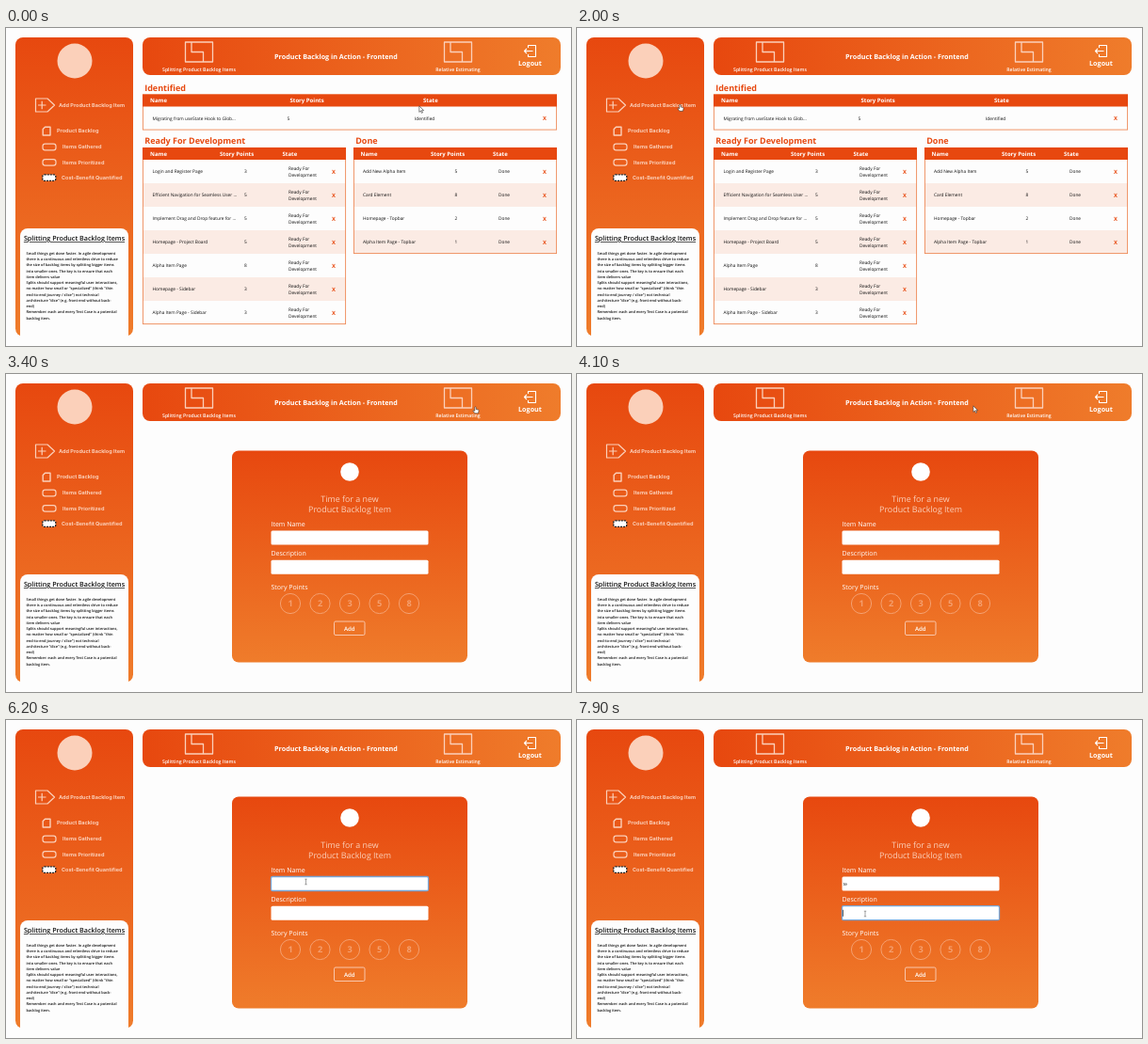
An HTML page that plays this animation: 600x338 px, repeating every 8000 ms.

```html
<!DOCTYPE html>
<html lang="en">
<head>
<meta charset="utf-8">
<title>Product Backlog</title>
<style>
html, body { margin: 0; width: 100%; height: 100%; overflow: hidden; background: #fdfdfd; }
svg { display: block; width: 600px; height: 338px; }
text { font-family: "Open Sans", "Noto Sans", sans-serif; white-space: pre; text-rendering: geometricPrecision; }
.menu text { font-family: Inter, Roboto, sans-serif; }
</style>
</head>
<body>
<svg id="stage" viewBox="0 0 600 338" xmlns="http://www.w3.org/2000/svg"></svg>
<script>
const LOOP = 8000, ORANGE = '#e7480f', PEACH = '#fbd0ba', INK = '#111';

// y is the middle of the capitals
const text = (x, y, s, size, fill = INK, weight = 400, anchor = 'start', extra = '') =>
  `<text x="${x}" y="${y + size * .36}" font-size="${size}" fill="${fill}" font-weight="${weight}" text-anchor="${anchor}" ${extra}>${s}</text>`;
const rect = (x, y, w, h, fill, r = 0, extra = '') =>
  `<rect x="${x}" y="${y}" width="${w}" height="${h}" rx="${r}" fill="${fill}" ${extra}/>`;
const line = (d, stroke = PEACH, width = 1.2) =>
  `<path d="${d}" fill="none" stroke="${stroke}" stroke-width="${width}" stroke-linejoin="round"/>`;
const gradient = (id, x, y) =>
  `<linearGradient id="${id}" x2="${x}" y2="${y}"><stop stop-color="${ORANGE}"/><stop offset="1" stop-color="#ef7c2b"/></linearGradient>`;

function sidebar() {
  const notes = [
    'Small things get done faster. In agile development',
    'there is a continuous and relentless drive to reduce',
    'the size of backlog items by splitting bigger items',
    'into smaller ones. The key is to ensure that each',
    'item delivers value',
    'Splits should support meaningful user interactions,',
    'no matter how small or "specialized" (think "thin',
    'end-to-end journey / slice") not technical',
    'architecture "dice" (e.g. front-end without back-',
    'end)',
    'Remember: each and every Test Case is a potential',
    'backlog item.'];
  const links = [[56, 82, 'Add Product Backlog Item'], [54, 109.5, 'Product Backlog'],
    [60, 126.5, 'Items Gathered'], [60, 143, 'Items Prioritized'], [59, 159, 'Cost-Benefit Quantified']];
  const pill = y => rect(39, y, 14, 6.6, 'none', 2.6, `stroke="${PEACH}" stroke-width="1.2"`);
  return rect(10, 10, 125, 317.5, 'url(#down)', 8) +
    `<circle cx="73" cy="35" r="18.5" fill="${PEACH}"/>` +
    line('M31.5 75H44L51.5 82L44 89H31.5ZM34 82H42.5M38.2 77.8V86.2') +
    line('M41.5 105.2H47V114H39.2V107.6Z', PEACH, 1.4) +
    pill(123.2) + pill(139.6) +
    rect(38.8, 155.8, 14, 6.6, '#fff', 2, 'stroke="#222" stroke-width="1.3" stroke-dasharray="2 1"') +
    `<g class="menu">${links.map(l => text(...l, 5.55, PEACH, 700)).join('')}</g>` +
    `<path d="M15 328V221a8 8 0 0 1 8-8H122a8 8 0 0 1 8 8V328Z" fill="#fdfdfd"/>` +
    text(72.5, 223.7, 'Splitting Product Backlog Items', 7.15, INK, 600, 'middle', 'text-decoration="underline"') +
    notes.map((s, i) => text(21.5, 239.3 + i * 6.27, s, 3.95, INK, 600)).join('');
}

function topbar() {
  const split = x => line(`M${x} 15H${x + 29}V36H${x}ZM${x + 6.5} 15V25.5H${x + 19}V36`, PEACH, 1.3);
  return rect(145, 10, 444, 40, 'url(#across)', 8) + split(190.5) + split(465.5) +
    text(205, 44.5, 'Splitting Product Backlog Items', 5.2, '#fff', 600, 'middle') +
    text(480, 44.5, 'Relative Estimating', 5.15, '#fff', 600, 'middle') +
    text(350.5, 30, 'Product Backlog in Action - Frontend', 7.2, '#fff', 700, 'middle') +
    line('M554.5 21V18.5H562.5V30.5H554.5V28M559.5 24.5H550.5M553 22L550.5 24.5L553 27', '#fff', 1.1) +
    text(556.5, 37.5, 'Logout', 7.2, '#fff', 700, 'middle');
}

// cols: left edges of header and cell text for name, points, state; x of the delete mark
function table(title, x, y, w, cols, rows) {
  const bottom = y + 13 + rows.length * 25;
  let out = text(x + 2.2, y - 6.8, title, 9, ORANGE, 700);
  rows.forEach(([name, points, state], i) => {
    const mid = y + 25.7 + i * 25, parts = state.split('|');
    if (i % 2) out += rect(x, y + 13 + i * 25, w, 25, '#fbebe4');
    out += text(cols.cell[0], mid, name, 4.8) + text(cols.cell[1], mid, points, 4.8) +
      parts.map((s, k) => text(cols.cell[2], mid + (k - (parts.length - 1) / 2) * 7.2, s, 4.8)).join('') +
      text(cols.del, mid, 'X', 5.8, ORANGE, 700, 'middle');
  });
  out += rect(x + .4, y + .4, w - .8, bottom - y - .8, 'none', 0, 'stroke="#ee8a58" stroke-width=".9"');
  out += rect(x, y, w, 13, ORANGE);
  ['Name', 'Story Points', 'State'].forEach((s, i) => out += text(cols.head[i], y + 6.7, s, 6, '#fff', 700));
  return out;
}

function board() {
  const ready = [['Login and Register Page', 3], ['Efficient Navigation for Seamless User ...', 5],
    ['Implement Drag and Drop feature for ...', 5], ['Homepage - Project Board', 5],
    ['Alpha Item Page', 8], ['Homepage - Sidebar', 3], ['Alpha Item Page - Sidebar', 3]];
  const done = [['Add New Alpha Item', 5], ['Card Element', 8], ['Homepage - Topbar', 2], ['Alpha Item Page - Topbar', 1]];
  return table('Identified', 145, 70.5, 440,
      { head: [153, 301.5, 443], cell: [155.5, 298.5, 434], del: 572 },
      [['Migrating from useState Hook to Glob...', 5, 'Identified']]) +
    table('Ready For Development', 145, 127, 216,
      { head: [153, 227, 293.5], cell: [155.5, 253, 300], del: 348 },
      ready.map(r => [...r, 'Ready For|Development'])) +
    table('Done', 369, 127, 216,
      { head: [376.5, 451, 517], cell: [379, 476.5, 523], del: 572 },
      done.map(r => [...r, 'Done']));
}

function form() {
  const field = (y, id) => rect(281.5, y, 167, 15, '#fff', 1.5, `id="${id}" stroke-width="1.3"`);
  return rect(240, 81.5, 250, 225, 'url(#down)', 7) +
    '<circle cx="365" cy="104" r="9.8" fill="#fff"/>' +
    text(365, 132.3, 'Time for a new', 8.9, PEACH, 400, 'middle') +
    text(365, 144, 'Product Backlog Item', 8.9, PEACH, 400, 'middle') +
    text(281.5, 159.5, 'Item Name', 7, '#fff') + field(166.5, 'field0') +
    text(281.5, 190.8, 'Description', 7, '#fff') + field(197.7, 'field1') +
    text(281.5, 226, 'Story Points', 7, '#fff') +
    [1, 2, 3, 5, 8].map((n, i) => {
      const x = 302 + i * 31.5;
      return `<g opacity=".5"><circle cx="${x}" cy="244" r="10.6" fill="none" stroke="${PEACH}"/>` +
        text(x, 244, n, 9.2, PEACH, 700, 'middle') + '</g>';
    }).join('') +
    rect(348.5, 263, 32.5, 14.5, 'none', 1.5, `stroke="${PEACH}" stroke-width=".9"`) +
    text(364.8, 270.5, 'Add', 6.1, '#fff', 600, 'middle') +
    text(282.7, 174.3, '', 4.6, INK, 400, 'start', 'id="typed"') +
    rect(282.3, 0, .7, 7, '#222', 0, 'id="caret"');
}

const pointers = {
  arrow: '<path d="M0 0V6.6L1.6 5.2L2.7 7.6L3.7 7.1L2.7 4.8H4.8Z" fill="#fff" stroke="#333" stroke-width=".6"/>',
  hand: '<path d="M-.7 .3Q0-.5.7.3V2.5L3.2 3.1Q3.7 3.3 3.6 4L3 6.8H-.7L-2.6 4.1Q-2.2 3.3-.7 4.2Z" fill="#fff" stroke="#333" stroke-width=".6"/>',
  beam: '<path d="M-1.2-2.8H1.2M0-2.8V2.8M-1.2 2.8H1.2" stroke="#666" stroke-width=".6"/>'
};

const $ = id => document.getElementById(id);
$('stage').innerHTML = `<defs>${gradient('down', 0, 1)}${gradient('across', 1, 0)}</defs>` +
  sidebar() + topbar() + `<g id="board">${board()}</g><g id="form">${form()}</g>` +
  Object.entries(pointers).map(([k, s]) => `<g id="${k}">${s}</g>`).join('');

// pointer stops: time, x, y
const path = [[0, 438.8, 82.8], [400, 438.8, 82.8], [1600, 109.5, 81.5], [2400, 109.5, 81.5], [3300, 498.5, 35],
  [3800, 498.5, 35], [4700, 199, 30.5], [5000, 199, 30.5], [5700, 318.5, 172], [7000, 318.5, 172],
  [7400, 306, 206], [LOOP, 306, 206]];

function pointerAt(t) {
  const i = path.findIndex(p => p[0] > t), [t0, x0, y0] = path[i - 1], [t1, x1, y1] = path[i];
  const u = (t - t0) / (t1 - t0), e = u * u * (3 - 2 * u);
  return [x0 + (x1 - x0) * e, y0 + (y1 - y0) * e];
}

const inside = (x, y, l, t, r, b) => x >= l && x <= r && y >= t && y <= b;
function pointerKind(x, y, formOpen) {
  if (formOpen && (inside(x, y, 281, 166, 449, 182) || inside(x, y, 281, 197, 449, 213))) return 'beam';
  const link = inside(x, y, 30, 73, 130, 165) || inside(x, y, 164, 13, 246, 48) || inside(x, y, 455, 13, 505, 48);
  return link ? 'hand' : 'arrow';
}

const show = (id, on) => $(id).setAttribute('visibility', on ? 'visible' : 'hidden');

function draw(now) {
  const t = Math.floor(now % LOOP / 100) * 100, open = t >= 2100;
  show('board', !open);
  $('form').style.display = open ? '' : 'none';

  const focus = t >= 7500 ? 1 : t >= 5700 ? 0 : -1;
  for (const i of [0, 1]) {
    $('field' + i).setAttribute('stroke', i === focus ? '#78a5d4' : 'none');
  }
  $('typed').textContent = 'te'.slice(0, t >= 6800 ? 2 : t >= 6600 ? 1 : 0);
  const since = t - (focus ? 7500 : t >= 6800 ? 6800 : 5700);
  $('caret').style.display = focus >= 0 && since % 1000 < 500 ? '' : 'none';
  $('caret').setAttribute('y', focus ? 201.8 : 170.5);
  $('caret').setAttribute('x', focus ? 282.3 : 282.5 + $('typed').getComputedTextLength());

  const [x, y] = pointerAt(t), kind = pointerKind(x, y, open);
  for (const k in pointers) show(k, k === kind);
  $(kind).setAttribute('transform', `translate(${x} ${y})`);
}

const start = performance.now();
(function tick() {
  draw(performance.now() - start);
  requestAnimationFrame(tick);
})();
</script>
</body>
</html>
```
